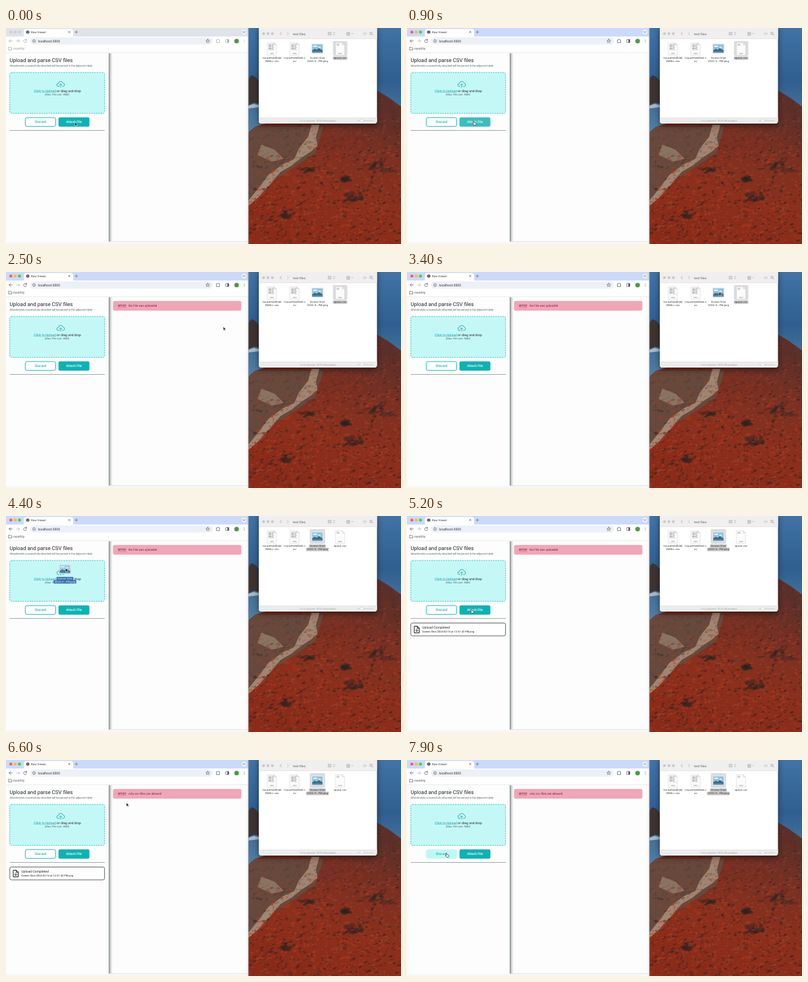
An HTML page with a canvas for the animation above (8000 ms loop, 600 by 330 pixels).

```html
<!DOCTYPE html>
<html lang="en">
<head>
<meta charset="utf-8">
<title>File upload</title>
<style>
html, body { margin: 0; width: 100%; height: 100%; overflow: hidden; background: #fff; }
canvas { display: block; width: 600px; height: 330px; }
</style>
</head>
<body>
<canvas id="stage"></canvas>
<script>
const W = 600, H = 330, LOOP = 8000, STEP = 100;
const canvas = document.getElementById('stage');
const dpr = window.devicePixelRatio || 1;
canvas.width = W * dpr;
canvas.height = H * dpr;
const screen2d = canvas.getContext('2d');
let g = screen2d;

const WEB = 'Roboto, sans-serif', MAC = 'Inter, sans-serif';
const TEAL = '#0cb3b4', AQUA = '#c4f8f6', INK = '#202427';

// ---------- helpers ----------
function text(s, x, y, size, color, o = {}) {
  g.font = `${o.weight || 400} ${size}px ${o.font || WEB}`;
  g.textRendering = 'geometricPrecision';
  g.textAlign = o.align || 'left';
  g.fillStyle = color;
  g.fillText(s, x, y);
  return g.measureText(s).width;
}
function rect(x, y, w, h, color) {
  g.fillStyle = color;
  g.fillRect(x, y, w, h);
}
function box(x, y, w, h, r, fill, stroke, lw = 1) {
  g.beginPath();
  g.roundRect(x, y, w, h, r);
  if (fill) { g.fillStyle = fill; g.fill(); }
  if (stroke) { g.strokeStyle = stroke; g.lineWidth = lw; g.stroke(); }
}
function dot(x, y, r, fill, stroke, lw = 0.7) {
  g.beginPath();
  g.arc(x, y, r, 0, 7);
  if (fill) { g.fillStyle = fill; g.fill(); }
  if (stroke) { g.strokeStyle = stroke; g.lineWidth = lw; g.stroke(); }
}
function path(d, fill, stroke, lw = 0.7, x = 0, y = 0) {
  const p = new Path2D(d);
  g.save();
  g.translate(x, y);
  g.lineJoin = g.lineCap = 'round';
  if (fill) { g.fillStyle = fill; g.fill(p); }
  if (stroke) { g.strokeStyle = stroke; g.lineWidth = lw; g.stroke(p); }
  g.restore();
}
function fade(x0, y0, x1, y1, ...colors) {
  const grad = g.createLinearGradient(x0, y0, x1, y1);
  colors.forEach((c, i) => grad.addColorStop(i / (colors.length - 1), c));
  return grad;
}
const clamp = v => Math.max(0, Math.min(1, v));
const ramp = (t, a, b) => clamp((t - a) / (b - a));
const ease = k => k * k * (3 - 2 * k);
function mix(a, b, k) {
  return `rgb(${a.map((v, i) => Math.round(v + (b[i] - v) * k))})`;
}
function random(seed) {
  return () => (seed = (seed * 16807) % 2147483647) / 2147483647;
}

// ---------- wallpaper ----------
function wallpaper() {
  rect(368, 0, 232, 330, fade(0, 0, 0, 160, '#4173a6', '#2f5e90', '#547fa3'));
  path('M368 78l5-6 6 3 6 7v34l-8-2-9 4z', '#3d3432');
  path('M368 119l8-3 9 2v3l-17 2z', '#a8bac6');
  const hill = 'M368 160l10-9 40-12 145-44 18 11 19 14v210H368z';
  path(hill, fade(560, 120, 490, 330, '#5c3029', '#7c3022', '#8c2f1c', '#8a2b19'));
  path('M368 160l10-9h104l-12 40-32 22-34 22-36 36z', '#66493d');
  path('M476 148l-5 18 2 14-10 9-14 9-15 12-17 10-14 17-20 22-15 13v-8l16-20 15-20 22-16 17-8 7-16 14-18 5-18z', '#a08672');
  path('M388 178l20 8 14 14-18 4-22-10z', '#8a7361');

  // shrubs and heather, kept on the hillside
  g.save();
  g.clip(new Path2D(hill));
  const rnd = random(77);
  const blob = (x, y, rx, ry, color, alpha) => {
    g.globalAlpha = alpha;
    g.fillStyle = color;
    g.beginPath();
    g.ellipse(x, y, rx, ry, -0.3, 0, 7);
    g.fill();
  };
  const tones = ['#b23c1e', '#2f2220', '#a8361c', '#54261e', '#8b4a35'];
  for (let i = 0; i < 2200; i++) {
    const x = 368 + rnd() * 232, y = 95 + rnd() * 235;
    const low = clamp((y - 170 + (x - 450) * 0.35) / 60);
    blob(x, y, 0.8 + rnd() * 2.6, 0.6 + rnd() * 1.2, tones[Math.floor(rnd() * tones.length)], 0.15 + 0.35 * low);
  }
  [[527, 258, 18], [458, 216, 13], [515, 232, 10], [565, 212, 22], [425, 285, 14]].forEach(([x, y, r]) => {
    for (let i = 0; i < 26; i++) {
      blob(x + (rnd() + rnd() - 1) * r, y + (rnd() + rnd() - 1) * r * 0.5, 1 + rnd() * 4, 1 + rnd() * 2, '#2b2422', 0.4);
    }
  });
  g.restore();
}

// ---------- browser ----------
function browser(active) {
  const icon = active ? '#505356' : '#a2a5a8';
  const dim = active ? '#44474a' : '#8e9194';
  rect(0, 0, 368, 330, '#fdfdfd');
  rect(0, 0, 368, 13, active ? '#cbdafb' : '#dfe3ea');
  const lights = active ? ['#f2605a', '#f5bd3f', '#53c34c'] : ['#cdd0d4', '#cdd0d4', '#cdd0d4'];
  lights.forEach((c, i) => dot(7.3 + i * 6.6, 6.2, 2.3, c));
  box(27, 1.5, 75, 14, [4, 4, 0, 0], '#fff');
  dot(33, 6.3, 2.5, '#3f4347');
  path('M31 5.4h4M31.2 7.6h3.4M33 4v4.6', null, '#cfd3d7', 0.4);
  text('Row Viewer', 38, 7.9, 4.4, '#303336');
  path('M94.8 4.9l2.5 2.5M97.3 4.9l-2.5 2.5', null, '#444', 0.6);
  path('M106.8 4.2v4M104.8 6.2h4', null, '#555', 0.6);
  dot(361.5, 6.2, 3.7, '#e9f0fb');
  path('M360 5.6l1.5 1.5 1.5-1.5', null, '#444');

  rect(0, 13, 368, 25, '#fff');
  path('M9.6 19.8H4.8M7 17.6l-2.3 2.2L7 22', null, icon);
  path('M15.8 19.8h4.8M18.4 17.6l2.3 2.2-2.3 2.2', null, '#b0b0b0');
  path('M31 18.4a2.4 2.4 0 1 0 .4 2.3M31.3 17v1.8h-1.8', null, icon);
  box(36.5, 14.2, 277.5, 11.4, 5.7, '#edf1f7');
  dot(42.6, 19.9, 2.2, null, '#555', 0.6);
  path('M42.6 19.8v1.2M42.6 18.7v.1', null, '#555', 0.6);
  text('localhost:3000', 48.5, 21.7, 5.1, '#2c2f33');
  path('M306.5 17l.8 1.9 2 .1-1.5 1.3.5 2-1.8-1.1-1.8 1.1.5-2-1.5-1.3 2-.1z', null, '#4a4d50', 0.6);
  path('M320 18h1.4a.8.8 0 0 1 1.6 0h1.4v4.3H320z', null, icon);
  box(333.7, 17.6, 4.8, 4.6, 0.6, null, icon, 0.7);
  rect(336.3, 17.6, 2.2, 4.6, icon);
  dot(350.3, 19.9, 3.5, '#4d9c41');
  [18, 19.9, 21.8].forEach(y => dot(362, y, 0.5, icon));
  path('M4.2 29.3h1.7l.7.8h2.2v3.4H4.2z', null, dim, 0.6);
  text('monthly', 11, 33, 4.7, dim);
  rect(0, 37.5, 368, 0.7, '#dde1e6');

  rect(156, 38.5, 6, 288, fade(156, 0, 162, 0, '#7d8385', '#bfc3c4', '#e6e8e8', '#fdfdfd'));
  rect(157, 325.8, 210, 0.7, '#dadada');
  rect(0, 327, 368, 3, '#f7f7f7');
  rect(364.6, 38.5, 0.5, 287.5, '#ececec');
  rect(367.5, 0, 1, 330, '#a9adb1');
}

function uploadPanel() {
  text('Upload and parse CSV files', 5.4, 51.8, 8, INK);
  text('Attachments successfully attached will be parsed in the adjacent table.', 5.4, 59, 4.03, '#55595c');
  g.setLineDash([2.2, 1.4]);
  box(5.8, 68, 144, 62.3, 2.5, AQUA, '#3cc9c6', 1);
  g.setLineDash([]);
  path('M80.4 89.4h-.6a2.4 2.4 0 0 1-.2-4.8 3.5 3.5 0 0 1 6.8-.7 2.8 2.8 0 0 1 .3 5.5h-.9M83 90.4v-4.6M81.2 87.2l1.8-1.8 1.8 1.8', null, '#139fa2', 0.8);
  const w = text('Click to Upload', 42.2, 97.5, 5.04, '#139c9f');
  rect(42.2, 98.2, w, 0.4, '#5cc4c4');
  text(' or drag and drop', 42.2 + w, 97.5, 5.04, INK);
  text('(Max. File size: 5MB)', 77.5, 103.2, 4.03, '#586466', { align: 'center' });
  rect(5.5, 156, 144.5, 1, '#a6aaac');
}

function buttons(discard, attach) {
  const bg = mix([255, 255, 255], [190, 248, 245], discard);
  const edge = mix([12, 179, 180], [190, 248, 245], discard);
  box(29.3, 136.9, 46.2, 13.4, 2.4, bg, edge, 0.9);
  text('Discard', 52.5, 145.4, 5.04, TEAL, { align: 'center', weight: 500 });
  box(79.7, 136.5, 47, 14.3, 2.5, mix([12, 179, 180], [104, 201, 200], attach));
  text('Attach File', 103.2, 145.4, 5.04, '#fff', { align: 'center', weight: 500 });
}

function fileCard() {
  box(5.8, 163.5, 143.9, 19.6, 2.5, '#fff', '#3c3f41', 0.8);
  path('M11.4 168.4h4.4l2.7 2.7v7.5h-7.1zM15.6 168.6v2.7h2.7', null, '#151515', 1);
  path('M15 172.6v3.6M13.4 174.8l1.6 1.7 1.6-1.7', null, '#151515', 0.9);
  text('Upload Completed', 23.3, 172.2, 5.04, '#1b1d1f');
  text('Screen Shot 2024-02-16 at 12.57.42 PM.png', 23.3, 178.2, 4.03, '#1b1d1f');
}

function errorBar(message) {
  box(162.5, 44.3, 195, 14.7, 2.5, '#f0a6b8');
  const w = text('error', 170, 53.4, 6, '#7f1738');
  rect(170, 54.4, w, 0.4, '#b9637e');
  text(message, 186.3, 53.2, 4.53, '#7f1738');
}

// ---------- file manager ----------
function sheet(x, rows) {
  path('M-6.8-9.6H3.4l3.4 3.4V9.6H-6.8z', '#fbfbfb', '#cfcfcf', 0.5, x, 32);
  path('M3.4-9.6v3.4h3.4', '#e9e9e9', '#c4c4c4', 0.5, x, 32);
  for (let i = 0; i < rows; i++) {
    rect(x - 5.2, 24.5 + i * 1.35, rows > 3 ? 8.5 - (i % 3) : 4, 0.7, '#9a9a9a');
  }
  if (rows > 3) rect(x - 1.2, 24.2, 0.8, rows * 1.35, '#fbfbfb');
  text('CSV', x, 39.6, 2.8, '#888', { align: 'center', font: MAC, weight: 600 });
}
function thumb(x, y) {
  box(x - 9, y - 7.3, 18, 14.6, 0.6, '#fff', '#c4c4c4', 0.5);
  rect(x - 8, y - 6.3, 16, 12.6, '#8cc3e6');
  path('M-8 3l4-2.5 3 1.5 3-2.5 6 3.5v2H-8z', '#48666e', null, 0, x, y);
  rect(x - 8, y + 3.8, 16, 2.5, '#3f86bd');
  rect(x - 6.4, y - 4.5, 6, 2.2, '#e5f1f7');
  rect(x + 1.6, y - 3, 3.6, 2.2, '#f2e6ba');
}
function label(x, y, lines, bg, color = '#333') {
  lines.forEach((s, i) => {
    const size = 3.95, by = y + i * 5;
    if (bg) {
      g.font = `400 ${size}px ${MAC}`;
      const w = g.measureText(s).width + 3;
      box(x - w / 2, by - 4, w, 5.3, 1.1, bg);
    }
    text(s, x, by, size, color, { align: 'center', font: MAC });
  });
}
const SHOT = ['Screen Shot', '2024-0...PM.png'];

function finder(shotPicked) {
  g.save();
  g.shadowColor = 'rgba(0,0,0,.5)';
  g.shadowBlur = 9 * dpr;
  g.shadowOffsetY = 3 * dpr;
  box(384, -4, 179.5, 150, 4, '#fff');
  g.restore();
  rect(384, 0, 179.5, 16.7, '#f0eeee');
  rect(384, 16.4, 179.5, 0.5, '#d9d7d7');
  box(384, 137, 179.5, 9, [0, 0, 4, 4], '#ececec');
  rect(384, 136.8, 179.5, 0.5, '#d8d8d8');
  for (let i = 0; i < 3; i++) dot(391.2 + i * 6.7, 8.6, 2.2, '#cbc9c9');
  path('M418.4 6.6l-2 2 2 2', null, '#959595');
  path('M427.4 6.6l2 2-2 2', null, '#b4b4b4');
  text('test files', 436, 10.5, 4.6, '#757575', { font: MAC, weight: 600 });
  for (let i = 0; i < 4; i++) {
    box(489.2 + (i % 2) * 2.7, 6.4 + (i >> 1) * 2.7, 1.8, 1.8, 0.3, null, '#999', 0.5);
  }
  path('M497 7.7l1.2-1.3 1.2 1.3M497 9.5l1.2 1.3 1.2-1.3', null, '#999', 0.6);
  for (let i = 0; i < 3; i++) rect(517, 6.6 + i * 1.9, 5.6, 1, '#aaa');
  path('M525 8l1.1 1.2L527.2 8', null, '#aaa', 0.6);
  path('M543 7l1.6 1.6L543 10.2M545.6 7l1.6 1.6-1.6 1.6', null, '#999', 0.6);
  dot(554.4, 8.1, 1.8, null, '#909090', 0.7);
  path('M555.8 9.5l1.6 1.6', null, '#909090');
  text('1 of 4 selected, 167.81 GB available', 473.7, 143, 3.4, '#9a9a9a', { align: 'center', font: MAC });
  rect(534.5, 141.3, 24, 0.7, '#c6c6c6');
  dot(540.3, 141.6, 2.2, '#fff', '#c9c9c9', 0.5);

  const pick = '#c6c6c6';
  if (shotPicked) box(461.5, 20, 23.2, 22.4, 1.8, '#dcdcdc');
  else box(496.6, 20, 21.8, 22.8, 1.8, '#dcdcdc');
  sheet(404, 7);
  sheet(438.5, 7);
  sheet(507.5, 2);
  thumb(473, 31.3);
  label(404, 47.4, ['houseHoldDebt', 'SMALL.csv']);
  label(438.5, 47.4, ['houseHoldDebt.c', 'sv']);
  label(473, 47.4, SHOT, shotPicked && pick);
  label(507.5, 47.4, ['space.csv'], !shotPicked && pick);
}

// ---------- pointer ----------
const ROUTE = [
  [0, 104.6, 144.2], [700, 104.6, 144.2], [900, 100.2, 142.2], [1900, 100.2, 142.2],
  [2900, 455, 52], [3300, 474, 31], [3600, 474, 31], [4300, 90.5, 80], [4600, 90.5, 80],
  [5100, 96.6, 142.2], [5700, 98, 142.2], [6300, 183, 65.5], [6800, 183, 65.5],
  [7400, 58.8, 142.2], [8000, 58.8, 142.2]
];
function pointerAt(t) {
  let i = 1;
  while (i < ROUTE.length - 1 && ROUTE[i][0] <= t) i++;
  const [t0, x0, y0] = ROUTE[i - 1], [t1, x1, y1] = ROUTE[i];
  const k = ease(ramp(t, t0, t1));
  return [x0 + (x1 - x0) * k, y0 + (y1 - y0) * k];
}
function pointer(x, y, hand) {
  if (hand) {
    path('M.2.4q.7-.6 1.1.2l.5 1.6 2.3.5q.8.3.6 1.2l-.5 2.4H1.5L-.4 4q-.2-.8.7-.5l.4.3z', '#fff', '#222', 0.6, x, y);
  } else {
    path('M0 0v5.4l1.3-1.2.9 2 .9-.4-.9-1.9h1.7z', '#111', '#fff', 0.5, x, y);
  }
}

// ---------- scene ----------
function backdrop(active) {
  const layer = document.createElement('canvas');
  layer.width = canvas.width;
  layer.height = canvas.height;
  g = layer.getContext('2d');
  g.scale(dpr, dpr);
  wallpaper();
  browser(active);
  uploadPanel();
  g = screen2d;
  return layer;
}
const inactive = backdrop(false), active = backdrop(true);

function draw(t) {
  g.setTransform(1, 0, 0, 1, 0, 0);
  g.drawImage(t < 100 ? inactive : active, 0, 0);
  g.scale(dpr, dpr);

  const attach = ramp(t, 800, 1000) - ramp(t, 1900, 2200) + ramp(t, 5200, 5500) - ramp(t, 5700, 6000);
  buttons(ramp(t, 7200, 7500), attach);
  if (t >= 4700 && t < 7600) fileCard();
  if (t >= 1000) errorBar(t < 5600 ? 'No File was uploaded' : 'only csv files are allowed');
  finder(t >= 3500);

  const [x, y] = pointerAt(t);
  if (t >= 3600 && t < 4600) {
    g.globalAlpha = 0.85;
    thumb(x - 1, y + 1);
    label(x - 1, y + 17, SHOT, '#2c63ae', '#fff');
    g.globalAlpha = 1;
  }
  const overButton = y > 137 && y < 151 && x > 29 && x < 127;
  pointer(x, y, overButton && t >= 800);
}

function tick() {
  const t = performance.now() % LOOP;
  draw(Math.floor(t / STEP) * STEP);
  requestAnimationFrame(tick);
}
tick();
</script>
</body>
</html>
```
